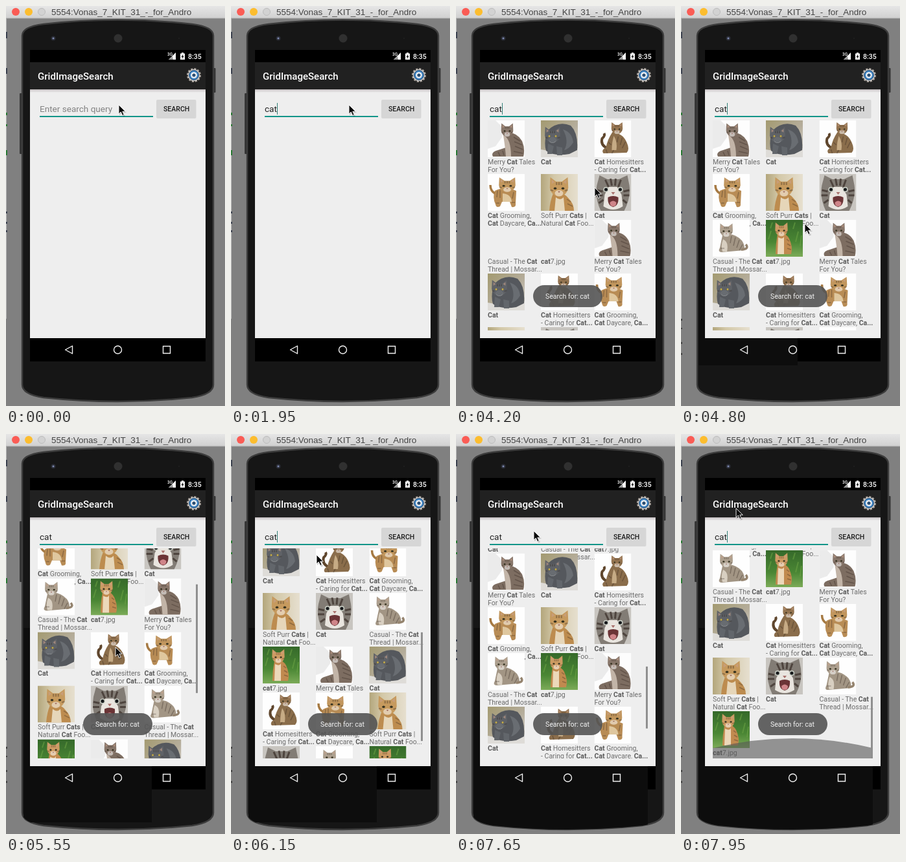
An HTML page for the animation above (8000 ms loop, 338 px wide and 619 px high).

```html
<!DOCTYPE html>
<html lang="en">
<head>
<meta charset="utf-8">
<title>Image search</title>
<style>
  html, body { margin: 0; width: 100%; height: 100%; overflow: hidden; background: #808080; }
  svg { display: block; }
  text { font-family: Roboto, sans-serif; white-space: pre; }
  .title { font: 13.5px "Liberation Sans", sans-serif; fill: #444; }
  .medium { font-weight: 500; }
  .label { font-size: 10.54px; fill: #6c6c6c; }
  .label .b { font-weight: 700; fill: #5a5a5a; }
  .field { font-size: 13.55px; }
  .fur { fill: none; stroke: #2c2119; stroke-opacity: .32; stroke-width: 1.5; }
</style>
</head>
<body>
<svg width="338" height="619" viewBox="0 0 338 619">
  <defs>
    <linearGradient id="bar" x2="0" y2="1">
      <stop stop-color="#e6e6e6"/><stop offset="1" stop-color="#d0d0d0"/>
    </linearGradient>
    <linearGradient id="shade" x2="0" y2="1">
      <stop stop-color="#c6c0c2"/><stop offset="1" stop-color="#eee"/>
    </linearGradient>
    <linearGradient id="wall">
      <stop stop-color="#b3a67c"/><stop offset=".35" stop-color="#d3c8a8"/><stop offset="1" stop-color="#e6dfcf"/>
    </linearGradient>
    <linearGradient id="room" x2="1" y2="1">
      <stop stop-color="#a39a70"/><stop offset=".55" stop-color="#b5ad9b"/><stop offset="1" stop-color="#dcdad6"/>
    </linearGradient>
    <linearGradient id="grass" x2="0" y2="1">
      <stop stop-color="#35692a"/><stop offset=".6" stop-color="#4a8634"/><stop offset="1" stop-color="#7cab58"/>
    </linearGradient>
    <path id="shell" d="M25 46Q25 32 58 28Q172 15 287 28Q320 32 320 46V586Q320 601 287 606Q172 618 58 606Q25 601 25 586Z"/>
    <clipPath id="inShell"><use href="#shell"/></clipPath>
    <clipPath id="list"><rect x="37" y="177" width="271" height="325"/></clipPath>
    <pattern id="mesh" width="2" height="2" patternUnits="userSpaceOnUse">
      <rect width="2" height="2" fill="#1c1c1c"/><circle cx="1" cy="1" r=".65" fill="#555"/>
    </pattern>

    <g id="head">
      <path d="M-9.500 -1L-9 -12L-3 -7.500H3L9 -12L9.500 -1Q8 7 0 8Q-8 7 -9.500 -1Z" fill="currentColor"/>
      <path d="M-7.500 -5V-9.500L-4.500 -7ZM7.500 -5V-9.500L4.500 -7Z" fill="#caa08a" opacity=".6"/>
      <path d="M-2.500 -7V-4M0 -7V-4M2.500 -7V-4M-9 1L-6 2M9 1L6 2" class="fur"/>
      <ellipse cy="4.500" rx="4.300" ry="3.200" fill="#fff" opacity=".5"/>
      <ellipse cx="-4" cy="-.5" rx="1.500" ry="1.200" fill="#33301f"/>
      <ellipse cx="4" cy="-.5" rx="1.500" ry="1.200" fill="#33301f"/>
      <path d="M-1.200 2.500H1.200L0 4Z" fill="#9a6257"/>
    </g>

    <symbol id="c0" viewBox="0 0 57 57">
      <path d="M0 0H57V57H0Z" fill="#fdfdfd"/>
      <path d="M0 0H12L22 10V26L12 40L0 44Z" fill="#ebebeb"/>
      <path d="M26 20Q44 16 53 32Q58 44 55 56L8 56Q4 49 16 46L28 42Z" fill="#7d6d61"/>
      <path d="M24 23Q36 28 36 56H28Q27 42 24 23Z" fill="#c2b4a7"/>
      <path d="M40 26L50 32M41 33L53 38M42 40L54 45M40 48L54 51M16 49L19 55M23 47L25 54" class="fur"/>
      <use href="#head" transform="translate(30 17) scale(.98 1.05)" color="#87766a"/>
    </symbol>
    <symbol id="c1" viewBox="0 0 57 57">
      <path d="M0 0H57V57H0Z" fill="url(#room)"/>
      <path d="M0 45Q30 52 57 43V57H0Z" fill="#dedcd8"/>
      <path d="M10 16Q26 0 46 8Q58 20 56 46L44 52Q20 56 8 47Q4 34 10 16Z" fill="#55585d"/>
      <path d="M34 14Q48 18 50 34Q44 44 36 46Q44 32 34 14Z" fill="#696d72"/>
      <path d="M11 36L10 52H17L20 40ZM24 40L25 54H33L33 42Z" fill="#62666b"/>
      <g transform="translate(18 25) scale(1.25)">
        <use href="#head" color="#5f6267"/>
        <ellipse cy="4" rx="4.500" ry="3.500" fill="#686c71"/>
        <circle cx="-4" cy="-.5" r="1.300" fill="#c0a950"/><circle cx="4" cy="-.5" r="1.300" fill="#c0a950"/>
      </g>
    </symbol>
    <symbol id="c2" viewBox="0 0 57 57">
      <path d="M0 0H57V57H0Z" fill="#fefefe"/>
      <path d="M20 43Q9 38 12 28Q17 24 15 20" fill="none" stroke="#5f462d" stroke-width="4"/>
      <path d="M28 18Q44 20 50 34Q55 45 50 50L14 51Q10 46 18 42Q20 30 28 18Z" fill="#8a6d4b"/>
      <path d="M30 24Q36 33 34 46L27 46Q27 34 30 24Z" fill="#c6ab85"/>
      <path d="M37 25L35 34M43 27L40 38M48 33L43 43M30 46L27 51M18 45L20 51M22 34L26 38" class="fur"/>
      <use href="#head" transform="translate(35 14) scale(.92)" color="#947450"/>
    </symbol>
    <symbol id="c3" viewBox="0 0 57 57">
      <path d="M0 0H57V57H0Z" fill="#fefefe"/>
      <path d="M11 26Q26 18 44 26L43 46Q44 52 37 51L34 43L22 43L19 50Q13 53 12 47Q7 36 11 26Z" fill="#b88c55"/>
      <path d="M11 30Q4 26 4 17" fill="none" stroke="#a67a43" stroke-width="3.500"/>
      <path d="M23 30Q36 31 37 43H23Z" fill="#dfc79e"/>
      <path d="M15 26L14 36M19 25L19 37M40 28L38 38M37 44H42M13 45H18" class="fur"/>
      <use href="#head" transform="translate(30 19) scale(1.35 1.15)" color="#c1965d"/>
    </symbol>
    <symbol id="c4" viewBox="0 0 57 57">
      <path d="M0 0H57V57H0Z" fill="url(#wall)"/>
      <path d="M19 30Q34 26 43 38Q51 46 51 57H13Q14 42 19 30Z" fill="#bd8c4f"/>
      <path d="M23 36Q30 42 35 36L37 57H21Z" fill="#e6d6b9"/>
      <path d="M40 39L46 43M41 46L49 50" class="fur"/>
      <use href="#head" transform="translate(28 23) scale(1.5)" color="#c69a5e"/>
    </symbol>
    <symbol id="c5" viewBox="0 0 57 57">
      <path d="M0 0H57V57H0Z" fill="#c8c5c0"/>
      <path d="M4 17L8 2L20 8H38L51 2L54 17Q57 36 46 57H10Q0 36 4 17Z" fill="#827c75"/>
      <path d="M17 9L22 20M25 7L27 18M33 7L32 18M41 9L37 20M4 25L13 27M3 33L13 33M54 25L45 27M54 33L45 33M7 45L14 40M50 45L44 40" class="fur" style="stroke-width:3;stroke-opacity:.6"/>
      <path d="M22 20H35L42 32L44 50Q29 60 14 50L16 32Z" fill="#e9e5df"/>
      <path d="M21 36Q29 32 37 36Q38 49 29 51Q20 49 21 36Z" fill="#6b3436"/>
      <path d="M24 44Q29 39 34 44Q34 50 29 50Q24 50 24 44Z" fill="#cf8589"/>
      <path d="M26 28H32L29 32Z" fill="#a9716c"/>
      <circle cx="18" cy="24" r="4" fill="#cdd2c8"/><circle cx="40" cy="24" r="4" fill="#cdd2c8"/>
      <circle cx="18" cy="24" r="2.600" fill="#17191b"/><circle cx="40" cy="24" r="2.600" fill="#17191b"/>
    </symbol>
    <symbol id="c6" viewBox="0 0 57 57">
      <path d="M0 0H57V57H0Z" fill="#fefefe"/>
      <path d="M15 24Q32 18 45 32Q51 41 48 47L14 50Q7 50 11 43Z" fill="#a29584"/>
      <path d="M44 46Q57 45 51 38" fill="none" stroke="#95846f" stroke-width="3.500"/>
      <path d="M16 30Q25 34 22 49H15Q12 40 16 30Z" fill="#d8cfc1"/>
      <path d="M29 25L27 36M35 27L32 40M41 31L37 43M46 38L41 47M12 44H18" class="fur"/>
      <use href="#head" transform="translate(21 18) scale(1.05)" color="#ada08f"/>
    </symbol>
    <symbol id="c7" viewBox="0 0 57 57">
      <path d="M0 0H57V57H0Z" fill="url(#grass)"/>
      <path d="M4 30L8 17M46 34L50 18M53 40L55 24M42 14L45 4M7 13L10 4" stroke="#69a044" stroke-opacity=".6" stroke-width="2"/>
      <path d="M18 22Q30 18 36 29Q42 42 39 53H15Q15 37 18 22Z" fill="#c18a4f"/>
      <path d="M19 27Q26 31 28 26L28 53H18Z" fill="#ecd8ba"/>
      <path d="M32 30L36 33M33 37L38 40M33 44L39 46" class="fur"/>
      <use href="#head" transform="translate(24 17) scale(1.02 1.08)" color="#cc9b62"/>
    </symbol>
  </defs>

  <!-- desktop and window bar -->
  <rect width="338" height="619" fill="#808080"/>
  <rect y="19" width="1" height="465" fill="#b4b4b4"/>
  <path d="M0 40H2V50H0ZM0 96H2V105H0ZM0 318H2V321H0ZM0 334H2V337H0ZM0 347H2V350H0Z" fill="#3d4350"/>
  <path d="M0 165H2V169H0ZM0 183H2V186H0ZM0 223H2V231H0Z" fill="#2c7a35"/>
  <path id="marks" d="M0 484H2V487H0ZM0 498H2V500H0ZM0 520H2V523H0ZM0 537H2V540H0Z" fill="#444"/>
  <rect width="338" height="19" fill="url(#bar)"/>
  <path d="M0 19H338" stroke="#aaa"/>
  <circle cx="15" cy="9" r="6" fill="#fa5c55"/>
  <circle cx="35" cy="9" r="6" fill="#fcbd2f"/>
  <circle cx="55" cy="9" r="5.500" fill="#d2d2d2" stroke="#bcbcbc"/>
  <text class="title" x="70" y="14">5554:Vonas_7_KIT_31_-_for_Andro</text>

  <!-- phone -->
  <rect x="21" y="135" width="5" height="94" rx="1" fill="#353535"/>
  <rect x="319" y="96" width="4.500" height="38" rx="1" fill="#353535"/>
  <use href="#shell" fill="#161616" stroke="#3c3c3c" stroke-width="2.500"/>
  <circle cx="73" cy="50" r="3.500" fill="#2b2e37"/>
  <circle cx="73" cy="50" r="1.500" fill="#7d88b0"/>
  <circle cx="173" cy="50" r="6.500" fill="url(#mesh)"/>
  <circle cx="267" cy="50" r="1" fill="#222"/>
  <rect x="37" y="514" width="271" height="36"/>
  <rect id="dim" x="27" y="300" fill="#0d0d0d" clip-path="url(#inShell)"/>
  <g fill="none" stroke="#f2f2f2" stroke-width="1.400">
    <path d="M102.500 526V538L91.500 532Z" stroke-linejoin="round"/>
    <circle cx="172.500" cy="532" r="6"/>
    <path d="M242.500 526.500H253.500V537.500H242.500Z"/>
  </g>

  <!-- app -->
  <rect x="37" y="68" width="271" height="19"/>
  <text class="medium" x="249" y="77" font-size="6.500" fill="#fff">3G</text>
  <path d="M262 72V83H251Z" fill="#fff"/>
  <path d="M257 78L258 83H251Z" fill="#999"/>
  <path d="M271 72H274V73.500H276V83H269V73.500H271Z" fill="#fff"/>
  <path d="M273.500 74.500L270.500 79H272.300L271.700 82L274.600 77.500H272.800Z"/>
  <text class="medium" x="281" y="82" font-size="10.540" fill="#fff">8:35</text>
  <rect x="37" y="87" width="271" height="42" fill="#212121"/>
  <text class="medium" x="49" y="114" font-size="15.060" fill="#fff">GridImageSearch</text>
  <g transform="translate(290 107)">
    <circle r="9.500" fill="none" stroke="#a9a29c" stroke-width="3" stroke-dasharray="3 1.974"/>
    <circle r="9.200" fill="#d4d2d0"/>
    <circle r="7.400" fill="#3f86c6" stroke="#24476c"/>
    <circle r="4.800" fill="#f4f5f6"/>
    <circle r="2.600" fill="#2c4f74"/>
  </g>
  <rect x="37" y="129" width="271" height="385" fill="#eee"/>
  <rect x="37" y="129" width="271" height="5" fill="url(#shade)"/>
  <text id="query" class="field" x="52" y="164"></text>
  <rect id="caret" y="150" width="1" height="18" fill="#2f7f77"/>
  <rect x="52" y="170" width="175" height="2" fill="#109488"/>
  <rect id="lift" x="232" y="146.500" width="62.500" height="29" rx="2" fill="#a9a9a9"/>
  <rect x="232" y="145" width="61.500" height="29" rx="2" fill="#d6d6d6"/>
  <text class="medium" x="243" y="163" font-size="10.540" fill="#1d1d1d">SEARCH</text>

  <g clip-path="url(#list)">
    <g id="grid"></g>
    <path id="glow" d="M49 486Q172 456 296 486V502H49Z" fill="#555" fill-opacity=".6"/>
    <rect id="thumb" x="293" width="3" fill="#8f8f8f"/>
  </g>

  <g id="toast">
    <rect x="119" y="432" width="107" height="34" rx="17" fill="#555" fill-opacity=".9"/>
    <text x="138" y="453" font-size="10.540" fill="#f4f4f4">Search for: cat</text>
  </g>

  <g id="mouse">
    <path d="M1 2V16L4.500 13L7 18.500L10 17.500L7.500 12H12Z" fill="#000" opacity=".18"/>
    <path d="M0 0V14L3.300 11L5.700 16.500L8.200 15.400L5.800 10.200H10.300Z" fill="#0a0a0a" stroke="#fff" stroke-width=".9"/>
  </g>
</svg>

<script>
const $ = id => document.getElementById(id);
const LOOP = 8000, STEP = 150, TOP = 177, VIEW = 325;
const COLS = [49, 131, 213.5], COUNT = 40;

// Caption lines; *stars* mark bold words.
const CAPTIONS = [
  ['Merry *Cat* Tales', 'For You?'],
  ['*Cat*'],
  ['*Cat* Homesitters', '- Caring for *Cat...*'],
  ['*Cat* Grooming,', '*Cat* Daycare, *Ca...*'],
  ['Soft Purr *Cats* |', 'Natural *Cat* Foo...'],
  ['*Cat*'],
  ['Casual - The *Cat*', 'Thread | Mossar...'],
  ['*cat*7.jpg']
];

const MOUSE = [
  [0, 174, 153], [1800, 174, 153], [1950, 182, 153], [2250, 232, 159], [2550, 260, 164],
  [3750, 260, 164], [4350, 199, 320], [4800, 191, 337], [4950, 196, 438], [5100, 196, 438],
  [6150, 132, 187], [6300, 136, 192], [6900, 194, 362], [7050, 196, 366], [7200, 194, 362],
  [7350, 186, 320], [7500, 160, 230], [7650, 120, 150], [7800, 92, 118], [7950, 85, 115]
];
const SCROLL = [
  [0, 0], [5100, 0], [6150, 251], [6300, 275], [6450, 295], [6600, 303],
  [7050, 303], [7200, 307], [7350, 345], [7500, 435], [7650, 620], [7800, 760], [7950, 779]
];
const BAR = [[0, 0], [5100, 0], [5250, 1], [6600, 1], [6900, 0], [7050, 0], [7200, 1]];
const TOAST = [[0, 0], [3450, 0], [3750, 1]];
const GLOW = [[0, 0], [7650, 0], [7950, 1]];

function at(table, t) {
  const i = table.findIndex(k => k[0] > t);
  if (i < 0) return table[table.length - 1].slice(1);
  const a = table[i - 1], b = table[i], p = (t - a[0]) / (b[0] - a[0]);
  return a.slice(1).map((v, n) => v + (b[n + 1] - v) * p);
}

// Each row takes its height from the caption of its last cell.
const images = [], rows = [];
function buildGrid() {
  let y = TOP;
  for (let i = 0; i < COUNT; i += 3) {
    let row = '';
    for (let c = 0; c < 3 && i + c < COUNT; c++) {
      const kind = (i + c) % 8, x = COLS[c];
      row += `<use href="#c${kind}" x="${x}" y="${y}" width="57" height="57"/>`;
      CAPTIONS[kind].forEach((line, n) => {
        const spans = line.replace(/\*(.+?)\*/g, '<tspan class="b">$1</tspan>');
        row += `<text class="label" x="${x}" y="${y + 67.5 + n * 12.3}">${spans}</text>`;
      });
    }
    const g = document.createElementNS('http://www.w3.org/2000/svg', 'g');
    g.innerHTML = row;
    $('grid').append(g);
    rows.push(g);
    images.push(...g.querySelectorAll('use'));
    y += CAPTIONS[(i + 2) % 8].length > 1 ? 83 : 71;
  }
}

function caretOn(t) {
  if (t < 3750) return t >= 450 && t < 2100 || t >= 2550 && t < 3000;
  return (t + 250) % 1000 < 500;
}

const show = (el, on) => el.setAttribute('opacity', +on);

function draw(time) {
  const t = Math.floor(time / STEP) * STEP;
  const typed = t < 1050 ? 0 : t < 1350 ? 1 : t < 1500 ? 2 : 3;
  $('query').textContent = typed ? 'cat'.slice(0, typed) : 'Enter search query';
  $('query').setAttribute('fill', typed ? '#212121' : '#828282');
  $('caret').setAttribute('x', [52, 59, 66, 71][typed]);
  show($('caret'), caretOn(t));
  show($('lift'), t >= 3450 && t < 3900);

  const [scroll] = at(SCROLL, t), loaded = t >= 6600;
  show($('grid'), t >= 3900);
  $('grid').setAttribute('transform', `translate(0 ${-scroll})`);
  images.forEach((im, i) => show(im, t >= 3900 + i % 8 * 60));
  rows.forEach((r, i) => show(r, loaded || i < 8));

  const total = loaded ? 1102 : 628;
  $('thumb').setAttribute('y', TOP + scroll / total * VIEW);
  $('thumb').setAttribute('height', VIEW * VIEW / total);
  show($('thumb'), at(BAR, t)[0]);
  show($('glow'), at(GLOW, t)[0]);
  show($('toast'), at(TOAST, t)[0]);

  const [w, h] = t < 4500 ? [0, 0] : t < 5250 ? [153, 256] : t < 6300 ? [198, 301] : [269, 316];
  $('dim').setAttribute('width', w);
  $('dim').setAttribute('height', h);
  show($('marks'), t >= 4500);

  const [x, y] = at(MOUSE, t);
  $('mouse').setAttribute('transform', `translate(${Math.round(x)} ${Math.round(y)})`);
}

buildGrid();
const start = performance.now();
function tick() {
  draw((performance.now() - start) % LOOP);
  requestAnimationFrame(tick);
}
tick();
</script>
</body>
</html>
```
